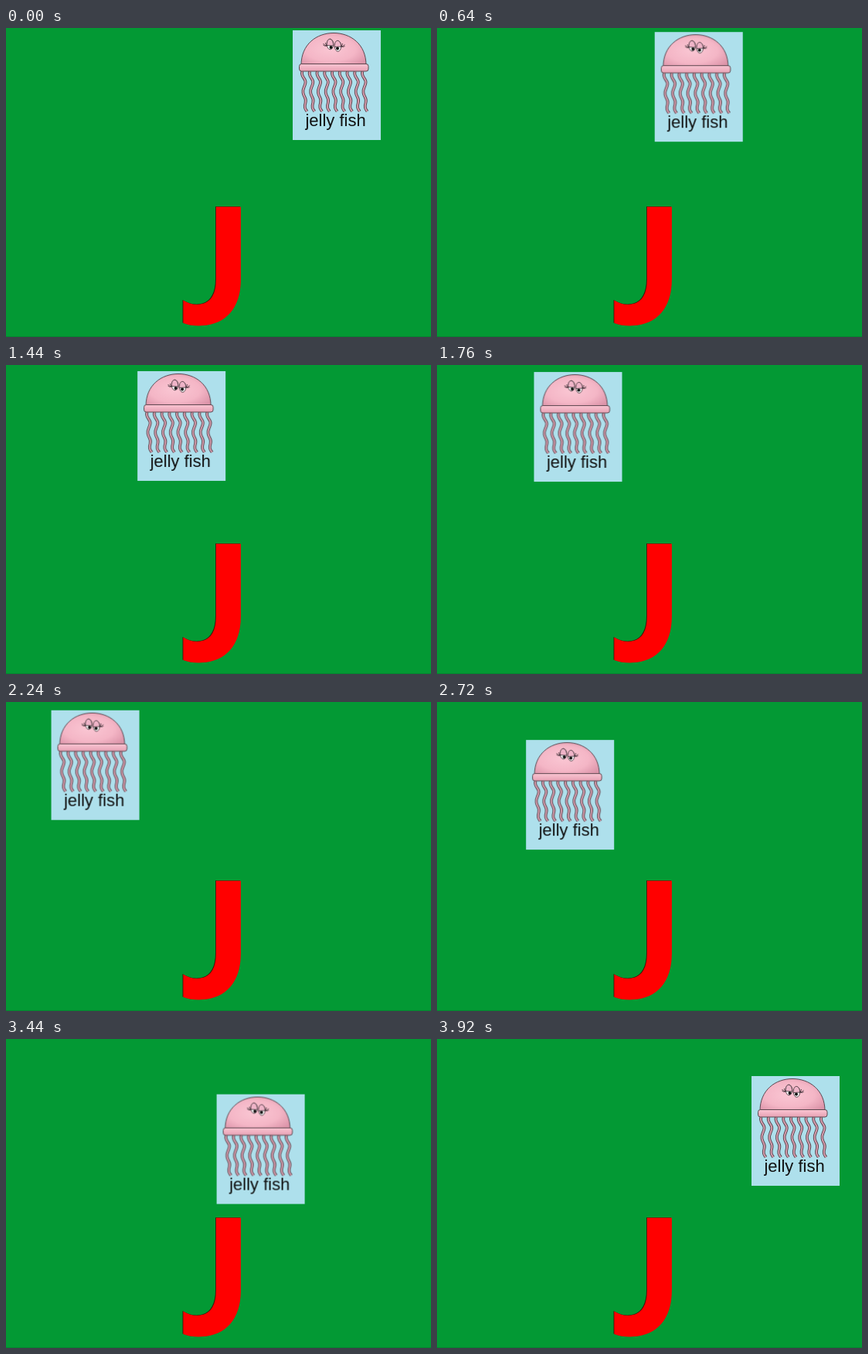
An HTML page without scripts for the animation above (4000 ms loop, 550 px wide and 400 px high).

```html
<!DOCTYPE html>
<html lang="en">
<head>
<meta charset="utf-8">
<title>J is for jelly fish</title>
<style>
  html, body { margin: 0; width: 100%; height: 100%; overflow: hidden; background: #039934; }
  svg { display: block; width: 550px; height: 400px; }

  /* The small negative delay keeps each step clear of its 80 ms boundary. */
  .card { animation: drift 4s -4ms infinite; }
  @keyframes drift {
    0%   { transform: translate(371px, 3px); animation-timing-function: steps(29); }
    58%  { transform: translate(47.4px, 11px); animation-timing-function: steps(10); }
    78%  { transform: translate(183px, 87.3px); animation-timing-function: steps(10); }
    98%, 100% { transform: translate(407px, 48px); }
  }

  .label { font: 22px "Liberation Sans", Arial, sans-serif; fill: #111; }
  .ink { stroke: #4d3a42; stroke-width: .9; }
  .lash { fill: none; stroke: #33262c; stroke-width: .8; }
</style>
</head>
<body>
<svg viewBox="0 0 550 400">
  <defs>
    <radialGradient id="skin" cx=".45" cy=".5" r=".65">
      <stop offset="0" stop-color="#fac6d3"/>
      <stop offset=".6" stop-color="#f4b6c6"/>
      <stop offset="1" stop-color="#dc94a9"/>
    </radialGradient>
    <linearGradient id="rim" x2="0" y2="1">
      <stop offset="0" stop-color="#fac5d2"/>
      <stop offset="1" stop-color="#e7a1b4"/>
    </linearGradient>
    <path id="wave" d="M0 53c-3 7 5 9 4 15s-4 7-3 13 5 7 3 13 0 8 2 11"/>
    <g id="arm" fill="none">
      <use href="#wave" stroke="#5c454f" stroke-width="3.800"/>
      <use href="#wave" stroke="#d69dad" stroke-width="1.900"/>
    </g>
    <g id="trio"><use href="#arm"/><use href="#arm" x="9.750"/><use href="#arm" x="19.500"/></g>
    <path id="letter" d="M271.500 231H303.500V325C303.500 364 282 385 249 385Q238 385 229 381.500V352Q238 357.500 247 357.500C263 357.500 271.500 346 271.500 325Z"/>
  </defs>

  <rect width="550" height="400" fill="#039934"/>
  <rect y="399" width="550" height="1" fill="#058430"/>

  <g role="img" aria-label="J">
    <use href="#letter" x="-.5" fill="#3a1808"/>
    <use href="#letter" x=".4" y=".4" fill="#f00"/>
  </g>

  <g class="card">
    <rect width="114" height="142" fill="#aee0ec"/>
    <use href="#trio" x="12.500"/>
    <use href="#trio" x="41.750"/>
    <use href="#trio" x="71"/>
    <path class="ink" d="M11 45C11 18 31 3.500 53 3.500S95 18 95 45Z" fill="url(#skin)"/>
    <rect class="ink" x="8.500" y="43.500" width="89.500" height="9.500" rx="3" fill="url(#rim)"/>

    <g class="ink">
      <ellipse cx="48.500" cy="18" rx="4.200" ry="6.800" fill="#fff"/>
      <ellipse cx="58.500" cy="20.500" rx="4.200" ry="6.800" fill="#fff"/>
      <path d="M44.200 19.500C43.500 8.500 52.500 8.500 52.800 20Z" fill="#efb4c8"/>
      <path d="M54.200 21.500C53.500 11 62 10.500 62.800 21Z" fill="#efb4c8"/>
    </g>
    <circle cx="49.500" cy="22" r="2" fill="#111"/>
    <circle cx="58" cy="23.500" r="2" fill="#111"/>
    <path class="lash" d="M44.500 20q-3 0-5-3m5 3q-2-2-2-4m2 4q-3 1-5-1M62.500 21q3 0 5-2.500m-5 2.500q2-2 2-4m-2 4q3 1 5-.500"/>

    <text class="label" x="16.400" y="124">jelly fish</text>
  </g>
</svg>
</body>
</html>
```
